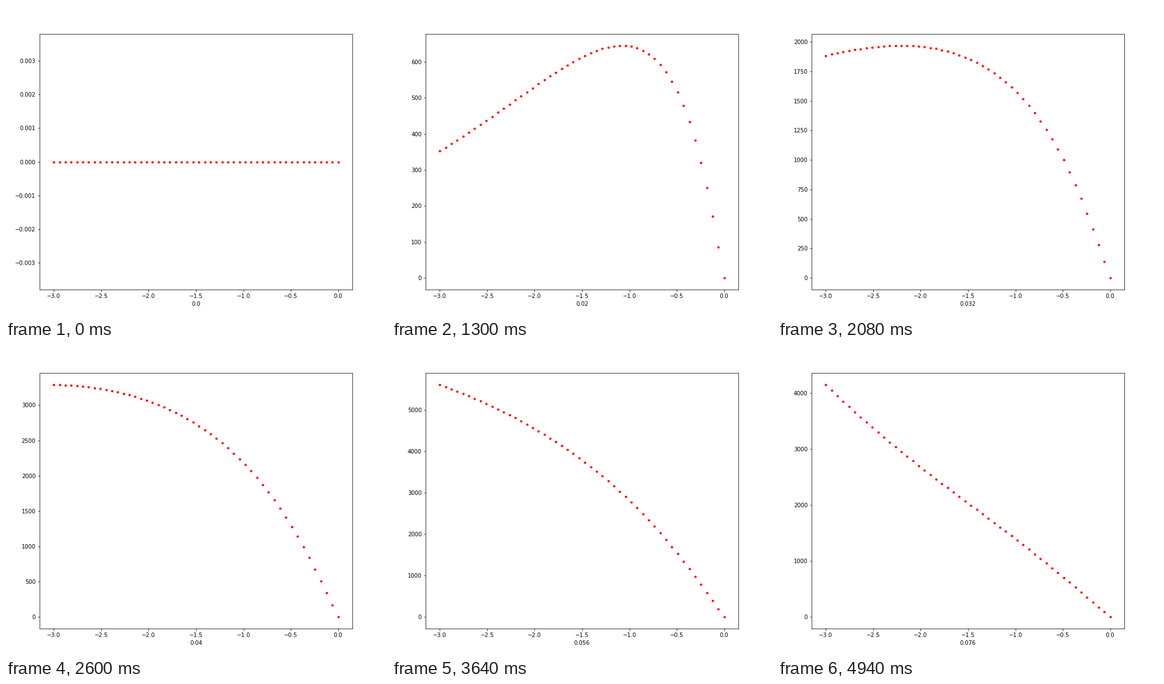
These frames come from a looping animation (678x556 px, 5.2 s). A matplotlib script:

```python
import numpy as np
import matplotlib.pyplot as plt
from matplotlib.animation import FuncAnimation

W, H, DPI = 678, 556, 72
STEPS, DT, COUNT = 20, 0.004, 50

# Key points of the highest value over time
KEY_STEPS = np.array([0, 3, 5, 8, 10, 14, 17, 19], float)
KEY_PEAKS = np.array([0, 196, 645, 1968, 3290, 5605, 5530, 4148], float)


def smooth(x, xs, ys):
    """Cubic Hermite interpolation through the points xs, ys."""
    slopes = np.gradient(ys, xs, edge_order=2)
    i = int(np.clip(np.searchsorted(xs, x, side="right") - 1, 0, len(xs) - 2))
    width = xs[i + 1] - xs[i]
    s = (x - xs[i]) / width
    return ((1 + 2 * s) * (1 - s) ** 2 * ys[i]
            + s * (1 - s) ** 2 * width * slopes[i]
            + s * s * (3 - 2 * s) * ys[i + 1]
            + s * s * (s - 1) * width * slopes[i + 1])


def peak_at(step):
    return smooth(step, KEY_STEPS, np.sqrt(KEY_PEAKS)) ** 2


def profile(step):
    """Straight at the right end, then damped; the damping widens with time."""
    k = np.arange(COUNT)
    if step == 0:
        return np.zeros(COUNT)
    reach = 4 * (step / 5) ** 0.78
    strength = 0.345 * (5 / step) ** 0.63
    lift = 1.33e-4 * (step / 19) ** 7
    damping = strength * ((1 + (k / reach) ** 3) ** 0.28 - 1)
    shape = k * np.exp(lift * k ** 2 - damping)
    return shape / shape.max() * peak_at(step)


fig = plt.figure(figsize=(W / DPI, H / DPI), dpi=DPI, facecolor="white")
ax = fig.add_axes([60 / W, 49 / H, 558 / W, 457 / H])
depth = np.linspace(0, -3, COUNT)
dots = ax.scatter(depth, np.zeros(COUNT), s=10, color="red")
ax.set_xlim(-3.15, 0.15)


def draw(step):
    values = profile(step)
    top = values.max()
    dots.set_offsets(np.column_stack([depth, values]))
    if top > 0:
        ax.set_ylim(-0.05 * top, 1.05 * top)
    else:
        ax.set_ylim(-0.003808, 0.003808)
    ax.set_xlabel(str(round(step * DT, 3)))
    return [dots]


anim = FuncAnimation(fig, draw, frames=STEPS, init_func=lambda: draw(0),
                     interval=260, repeat=True, repeat_delay=0, blit=False)
plt.show()
```
